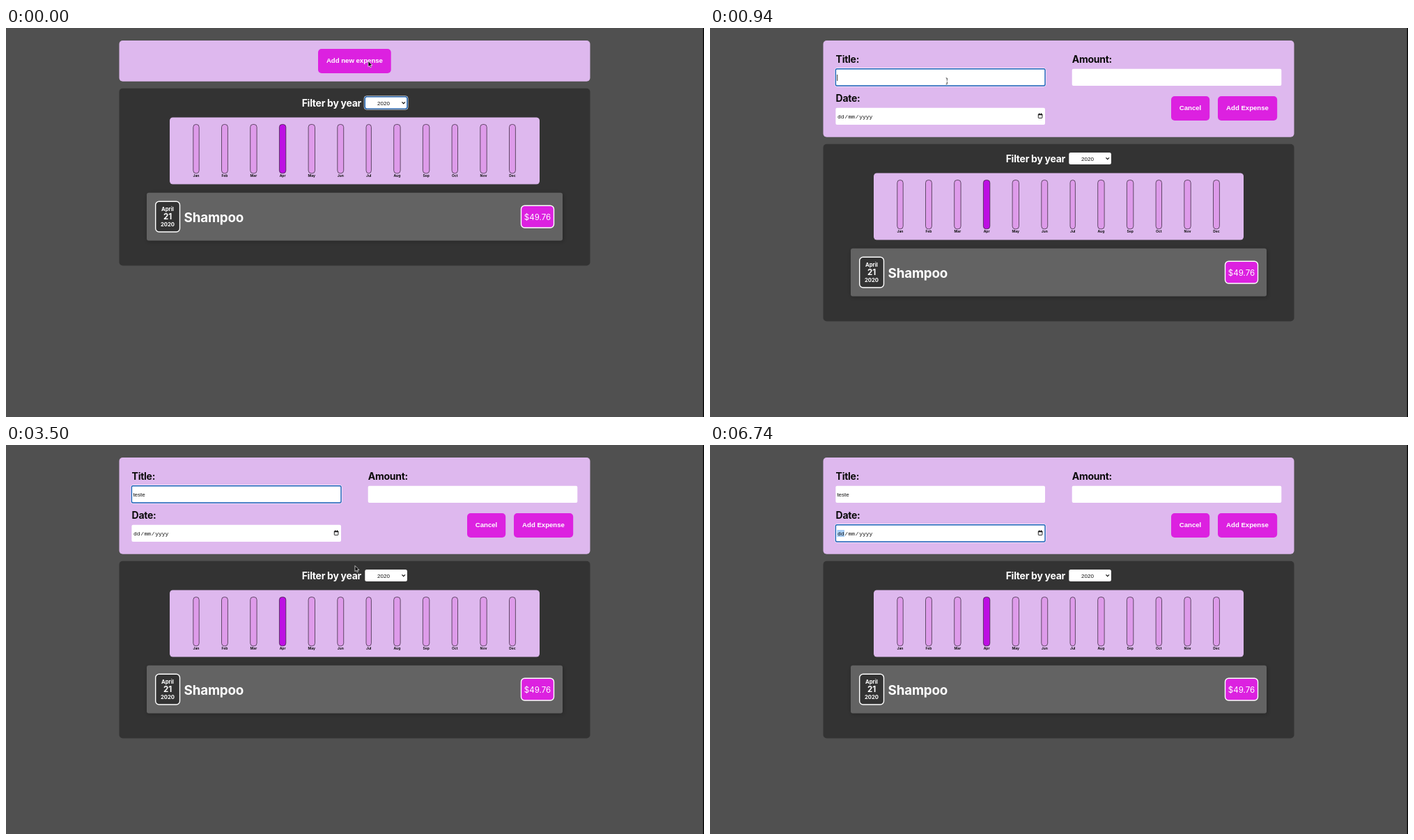
An HTML page for the animation above (8000 ms loop, 1002x559 px).

```html
<!DOCTYPE html>
<html lang="en">
<head>
<meta charset="utf-8">
<title>Expense tracker</title>
<style>
  html, body { margin: 0; width: 100%; height: 100%; overflow: hidden; background: #505050; }
  svg { display: block; width: 1002px; height: 559px; }
  text { font-family: Inter, sans-serif; font-weight: 700; font-optical-sizing: none; white-space: pre; }
  .panel { fill: #deb8ee; }
  .label { font-size: 14px; letter-spacing: -.02em; fill: #0b0b0b; }
  .white { fill: #fff; }
  .magenta { fill: #dc21e0; }
  .btn { font: 700 9.6px "Liberation Sans", Arial, sans-serif; fill: #fff; }
  .field { font: 400 8px "Liberation Sans", Arial, sans-serif; fill: #111; }
  .date { font: 400 8px "Liberation Mono", "Courier New", monospace; fill: #111; }
  .month { font-size: 5px; fill: #111; }
  .mid { text-anchor: middle; }
  .ring { fill: none; stroke: #1b63b8; stroke-width: 1.4; }
  .halo { fill: none; stroke: #fff; stroke-width: .8; }
  .line { fill: none; stroke: #111; }
</style>
</head>
<body>
<svg viewBox="0 0 1002 559">
  <defs>
    <filter id="shadow" x="-5%" y="-20%" width="110%" height="150%">
      <feDropShadow dx="1" dy="1.5" stdDeviation="3" flood-opacity=".25"/>
    </filter>
  </defs>
  <rect width="1002" height="559" fill="#505050"/>
  <rect x="1000.7" width="1.3" height="559" fill="#000"/>

  <rect id="top" class="panel" x="162.5" y="18" width="676" height="58.7" rx="5"/>
  <g id="closed">
    <rect class="magenta" x="448" y="30" width="104.7" height="35" rx="5"/>
    <text class="btn mid" x="500.4" y="50.4">Add new expense</text>
  </g>
  <g id="form">
    <text class="label" x="180.6" y="50">Title:</text>
    <text class="label" x="519.8" y="50">Amount:</text>
    <text class="label" x="180.6" y="106">Date:</text>
    <g class="white">
      <rect x="180.4" y="58.8" width="300.6" height="24.2" rx="2"/>
      <rect x="519.7" y="58.8" width="300.6" height="24.2" rx="2"/>
      <rect x="180.4" y="114.8" width="300.6" height="24.2" rx="2"/>
    </g>
    <g class="magenta">
      <rect x="662" y="98" width="55.2" height="35" rx="5"/>
      <rect x="729" y="98" width="85.2" height="35" rx="5"/>
    </g>
    <text class="btn mid" x="689.5" y="118.4">Cancel</text>
    <text class="btn mid" x="771.5" y="118.4">Add Expense</text>

    <text id="typed" class="field" x="182.4" y="73.8"></text>
    <rect id="caret" y="67" width=".8" height="9" fill="#000"/>
    <rect id="picked" x="182.4" y="122" width="10.6" height="10" fill="#a5cdf6"/>
    <text class="date" y="130"><tspan x="183">dd</tspan><tspan x="193.2">/</tspan><tspan x="198.4">mm</tspan><tspan x="208.8">/</tspan><tspan x="214.2">yyyy</tspan></text>
    <g>
      <rect class="line" x="471.3" y="123.8" width="5.6" height="5.6" rx=".6" stroke-width=".9"/>
      <path class="line" d="M471 124.6h6.2M472.6 122.6v1.5M475.6 122.6v1.5" stroke-width="1.1"/>
    </g>
    <g id="titleRing">
      <rect class="halo" x="179.3" y="57.7" width="302.8" height="26.4" rx="3"/>
      <rect class="ring" x="180.4" y="58.8" width="300.6" height="24.2" rx="2"/>
    </g>
    <g id="dateRing">
      <rect class="halo" x="179.3" y="113.7" width="302.8" height="26.4" rx="3"/>
      <rect class="ring" x="180.4" y="114.8" width="300.6" height="24.2" rx="2"/>
    </g>
  </g>

  <g id="list">
    <rect x="162.5" y="86.7" width="676" height="254.8" rx="5" fill="#333"/>
    <text class="label white" x="424.7" y="112.8" style="fill:#fff">Filter by year</text>
    <rect class="white" x="515.3" y="98.9" width="60.6" height="17.2" rx="2.5"/>
    <g id="selectRing">
      <rect class="halo" x="514.2" y="97.8" width="62.8" height="19.4" rx="3.4"/>
      <rect class="ring" x="515.3" y="98.9" width="60.6" height="17.2" rx="2.5"/>
    </g>
    <text class="field mid" x="542" y="110.5">2020</text>
    <path class="line" d="M568.4 106.4l2.3 2.3 2.3-2.3" stroke-width="1.2"/>
    <rect class="panel" x="235" y="128.4" width="531" height="96.2" rx="4.5"/>
    <g id="bars"></g>

    <rect x="202" y="236.7" width="597" height="68.9" rx="3" fill="#646464" filter="url(#shadow)"/>
    <rect x="214.7" y="249.2" width="34.8" height="43.8" rx="5" fill="#333" stroke="#fff" stroke-width="1.4"/>
    <g class="white mid">
      <text x="232" y="263.2" font-size="7.7">April</text>
      <text x="232" y="275.3" font-size="11.5">21</text>
      <text x="232" y="284.9" font-size="7.7">2020</text>
    </g>
    <text class="white" x="255.6" y="278.7" font-size="18.8" letter-spacing="-.2">Shampoo</text>
    <rect class="magenta" x="739.5" y="255.2" width="47" height="31.8" rx="5" stroke="#fff" stroke-width="1.4"/>
    <text class="white mid" x="763" y="275.6" font-size="11.5" style="font-weight:400">$49.76</text>
  </g>

  <path id="arrow" d="M0 0V8.2L1.9 6.5 3.1 9.3 4.5 8.7 3.3 6H5.9Z" fill="#000" stroke="#fff" stroke-width=".7"/>
  <path id="beam" d="M-1.6-4.5Q0-4.5 0-3.5Q0-4.5 1.6-4.5M0-3.5V3.5M-1.6 4.5Q0 4.5 0 3.5Q0 4.5 1.6 4.5" fill="none" stroke="#333" stroke-width=".9" stroke-dasharray="3 1.2"/>
</svg>
<script>
const LOOP = 8000;
const $ = id => document.getElementById(id);

// Each table holds [start ms, value...]; a value stays until the next row.
const pointer = [
  [0, 'arrow', 520, 47.5], [510, 'arrow', 508, 57], [580, 'arrow', 470, 78],
  [650, 'arrow', 425, 93], [720, 'arrow', 385, 96], [800, 'beam', 352, 84],
  [870, 'beam', 340.3, 76.3], [2830, 'none', 0, 0],
  [3000, 'arrow', 385.5, 42], [3070, 'arrow', 449.5, 0],
  [3330, 'arrow', 455, 120], [3420, 'arrow', 468, 252], [3500, 'arrow', 501, 173.5],
  [3570, 'arrow', 560, 142], [3630, 'arrow', 609.5, 125],
  [3790, 'arrow', 720, 92], [3870, 'arrow', 788, 86], [3950, 'arrow', 700, 100],
  [4030, 'arrow', 570, 116], [4100, 'arrow', 473.5, 126],
  [4440, 'arrow', 462, 119], [4510, 'arrow', 441.5, 110.5],
  [4680, 'arrow', 385, 180], [4760, 'arrow', 304.5, 261.5], [6740, 'none', 0, 0]
];
const typing = [[0, 0], [2340, 2], [2510, 3], [2740, 4], [2830, 5]];
const caret = [[0, 0], [940, 1], [1430, 0], [1930, 1], [3330, 0], [3830, 1], [4180, 0]];
const focus = [[0, 'select'], [50, ''], [940, 'title'], [4180, 'date']];

const at = (table, t) => table.findLast(row => row[0] <= t).slice(1);
const show = (id, on) => $(id).setAttribute('visibility', on ? 'inherit' : 'hidden');

function add(tag, attrs, text = '') {
  const el = document.createElementNS('http://www.w3.org/2000/svg', tag);
  for (const key in attrs) el.setAttribute(key, attrs[key]);
  el.textContent = text;
  $('bars').append(el);
}

const months = 'Jan Feb Mar Apr May Jun Jul Aug Sep Oct Nov Dec'.split(' ');
const widths = [9, 9.5, 10, 10, 10, 9.5, 8, 10, 10, 9, 10, 9.5];
let left = 268.5;
months.forEach((name, i) => {
  const w = widths[i];
  add('rect', {
    x: left + .3, y: 138.5, width: w - .6, height: 70.3, rx: 4,
    fill: name === 'Apr' ? '#bd0fe3' : '#de9bea', stroke: '#2b2030', 'stroke-width': .7
  });
  add('text', { class: 'month mid', x: left + w / 2, y: 213.8 }, name);
  left += w + 31.7;
});

function draw(t) {
  const open = t >= 130;
  $('top').setAttribute('height', open ? 138.7 : 58.7);
  $('list').setAttribute('transform', `translate(0 ${open ? 80 : 0})`);
  show('closed', !open);
  show('form', open);

  const [active] = at(focus, t);
  show('selectRing', active === 'select');
  show('titleRing', active === 'title');
  show('dateRing', active === 'date');
  show('picked', active === 'date');

  const word = 'teste'.slice(0, at(typing, t)[0]);
  if ($('typed').textContent !== word) $('typed').textContent = word;
  $('caret').setAttribute('x', 182.4 + (word ? $('typed').getComputedTextLength() : 0));
  $('caret').setAttribute('visibility', open && at(caret, t)[0] ? 'inherit' : 'hidden');

  const [kind, x, y] = at(pointer, t);
  for (const id of ['arrow', 'beam']) {
    show(id, kind === id);
    $(id).setAttribute('transform', `translate(${x} ${y})`);
  }
}

const start = performance.now();
function tick() {
  draw((performance.now() - start) % LOOP);
  requestAnimationFrame(tick);
}
tick();
</script>
</body>
</html>
```
